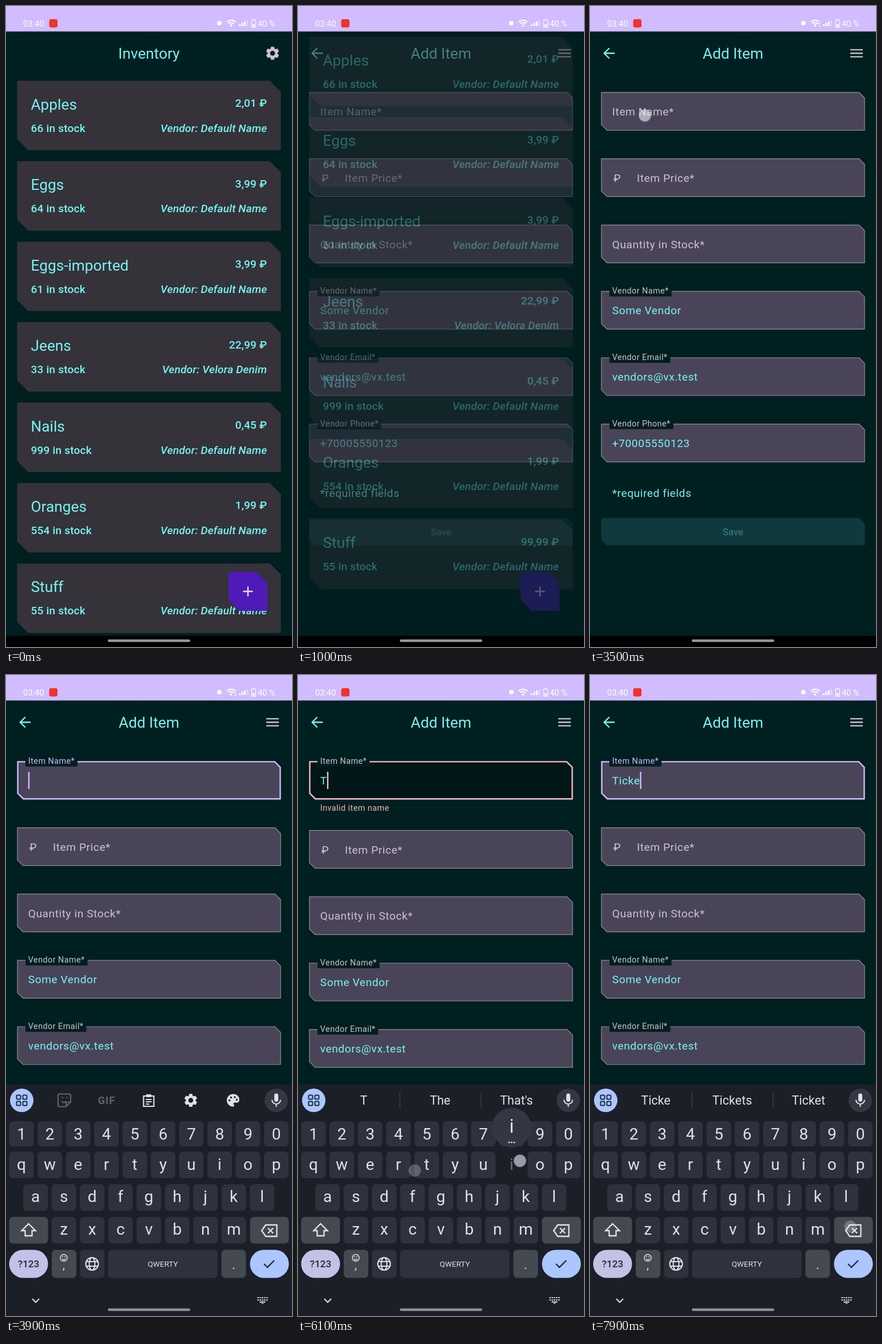
An HTML page for the animation above (8000 ms loop, 500 px wide and 1119 px high).

```html
<!DOCTYPE html>
<html lang="en">
<head>
<meta charset="utf-8">
<title>Inventory app</title>
<style>
  html, body { margin: 0; width: 100%; height: 100%; overflow: hidden; background: #001f20; }
  svg { display: block; width: 100%; height: 100%; font-family: Roboto, sans-serif; white-space: pre; }
</style>
</head>
<body>
<svg id="stage" viewBox="0 0 500 1119"></svg>
<script>
const LOOP = 8000, STEP = 100;
const TITLE = 26.25, BODY = 19.1, SMALL = 14.35;
const BG = '#001f20', CYAN = '#76f5f5', GREY = '#cac4d0', LILAC = '#d0bcff', PINK = '#fbbcc4';
const KB = '#1b1f28', KEY = '#2f323c', KEY2 = '#444952', INK = '#dfe2ea', BLUE = '#acc6ff';

const items = [
  ['Apples', '2,01', 66], ['Eggs', '3,99', 64], ['Eggs-imported', '3,99', 61],
  ['Jeens', '22,99', 33, 'Velora Denim'], ['Nails', '0,45', 999],
  ['Oranges', '1,99', 554], ['Stuff', '99,99', 55]
];
const fields = [
  ['Item Name*'], ['Item Price*'], ['Quantity in Stock*'],
  ['Vendor Name*', 'Some Vendor'], ['Vendor Email*', 'vendors@vx.test'], ['Vendor Phone*', '+70005550123']
];
// time, x, y, key
const taps = [
  [3500, 96, 191], [5200, 39, 970], [6000, 204, 865, 't'], [6100, 388, 848, 'i'],
  [6300, 205, 972, 'c'], [6400, 398, 915, 'k'], [6500, 131, 884, 'e'],
  [6900, 180, 858, 'r'], [7100, 222, 860, 't'], [7500, 455, 963, '<'], [7800, 455, 963, '<']
];
const hints = {
  T: ['T', 'The', "That's"], Ti: ['Ti', 'Time', 'Tim'], Tic: ['Tic', 'Tick', 'Ticket'],
  Tick: ['Tick', 'Ticket', 'Tickets'], Ticke: ['Ticke', 'Tickets', 'Ticket'],
  Ticker: ['Ticker', 'Tickers', 'Ticket'], Tickert: ['Tickert', 'Ticket', 'Tickets']
};

const clamp = v => Math.max(0, Math.min(1, v));
const between = (t, a, b) => t >= a && t < b;
const smooth = u => u * u * (3 - 2 * u);
// cubic-bezier(.4, 0, .2, 1)
function fastOut(u) {
  let lo = 0, hi = 1;
  for (let i = 0; i < 20; i++) {
    const s = (lo + hi) / 2;
    if (1.2 * s - 1.8 * s * s + 1.6 * s ** 3 < u) lo = s; else hi = s;
  }
  return smooth((lo + hi) / 2);
}
const pen = document.createElement('canvas').getContext('2d');
function textWidth(s, size, gap) {
  pen.font = `${size}px Roboto, sans-serif`;
  return pen.measureText(s).width + gap * s.length;
}

const text = (x, y, s, size, fill, more = '') =>
  `<text x="${x}" y="${y}" font-size="${size}" fill="${fill}" ${more}>${s}</text>`;
const MID = 'text-anchor="middle"', END = 'text-anchor="end"', MEDIUM = 'font-weight="500"';
const body = (x, y, s, fill) => text(x, y, s, BODY, fill, 'letter-spacing=".58"');
const strong = (x, y, s, more = '') => text(x, y, s, BODY, CYAN, `${MEDIUM} letter-spacing=".17" ${more}`);
const small = (x, y, s, fill) => text(x, y, s, SMALL, fill, 'letter-spacing=".46"');
const rect = (x, y, w, h, fill, r = 0) =>
  `<rect x="${x}" y="${y}" width="${w}" height="${h}" rx="${r}" fill="${fill}"/>`;
const disc = (x, y, r, fill, more = '') => `<circle cx="${x}" cy="${y}" r="${r}" fill="${fill}" ${more}/>`;
const group = (inner, more) => `<g ${more}>${inner}</g>`;
const line = (x, y, d, color, w = 2, fill = 'none') =>
  `<path transform="translate(${x} ${y})" d="${d}" fill="${fill}" stroke="${color}" stroke-width="${w}"/>`;
const cut = (x, y, w, h, c, fill, more = '') =>
  `<path d="M${x} ${y}h${w - c}l${c} ${c}v${h - c}h${c - w}l${-c} ${-c}z" fill="${fill}" ${more}/>`;

function gear(x, y, r, fill) {
  const pts = [];
  for (let k = 0; k < 6; k++)
    for (const [a, q] of [[-24, .74], [-14, 1], [14, 1], [24, .74]]) {
      const th = (k * 60 - 90 + a) * Math.PI / 180;
      pts.push((q * r * Math.cos(th)).toFixed(2) + ' ' + (q * r * Math.sin(th)).toFixed(2));
    }
  const h = r * .37;
  return `<path transform="translate(${x} ${y})" fill="${fill}" fill-rule="evenodd"
    d="M${pts.join('L')}zM${-h} 0a${h} ${h} 0 1 0 ${2 * h} 0a${h} ${h} 0 1 0 ${-2 * h} 0z"/>`;
}

function statusBar(t) {
  const W = '#fff';
  let s = rect(0, 0, 500, 44.5, LILAC) + text(30, 35.5, '03:40', 14.6, W) +
    rect(75.5, 23, 14.5, 14.5, '#f0322b', 3.5) + disc(373, 30, 4, W) +
    line(393.5, 35, 'M-7.8-7a11 11 0 0 1 15.6 0M-5-4a7 7 0 0 1 10 0', W, 2) + disc(393.5, 34, 2, W);
  for (let i = 0; i < 4; i++)
    s += `<g opacity="${i < 3 ? 1 : .35}">${rect(407 + i * 4.5, 32 - i * 2.5, 3, 3 + i * 2.5, W)}</g>`;
  if (between(t, 2700, 5700)) s += rect(400, 30, 2, 2, W) + rect(400, 34, 2, 2, W);
  return s + line(433, 30, 'M-3.5-5.5h7v13h-7zM-1.5-7h3', W, 1.2) + rect(431, 32, 4, 4, W) +
    text(440, 35.5, '40 %', 14.6, W);
}

function listScreen(t) {
  const scroll = 77 * smooth(clamp((t - 50) / 600));
  const headY = 82.5 - scroll / 2;
  let s = rect(0, 0, 500, 1119, BG) +
    group(text(250, headY + 9.3, 'Inventory', TITLE, CYAN, MID) + gear(466, headY, 11.7, GREY),
      'clip-path="url(#bar)"');
  items.forEach(([name, price, stock, vendor = 'Default Name'], i) => {
    const y = 130.5 + i * 140.45 - scroll;
    s += cut(19.5, y, 461, 121.2, 19.4, '#363239') + text(43.5, y + 50.2, name, TITLE, CYAN) +
      strong(456.3, y + 45.7, price + ' ₽', END) +
      strong(43.5, y + 89.2, stock + ' in stock') +
      strong(456.3, y + 89.2, 'Vendor: ' + vendor, END + ' font-style="italic"');
  });
  return `<clipPath id="bar"><rect y="44" width="500" height="${77 - scroll}"/></clipPath>` + s +
    cut(389, 988, 68, 68, 19.5, '#4f1ab8') + line(423, 1022, 'M-8.5 0h17M0-8.5v17', '#e9ddff', 2.4);
}

function typed(t) {
  let s = '';
  for (const [at, , , key] of taps)
    if (key && t >= at + STEP) s = key == '<' ? s.slice(0, -1) : s + (s ? key : 'T');
  return s;
}

function formScreen(t) {
  const value = typed(t), error = value.length == 1, focus = t >= 3600;
  const push = error ? 4.8 : 0;
  let s = line(33.5, 82.5, 'M9.7 0h-18M.3-9l-9 9l9 9', CYAN, 2.4) +
    text(250, 91.8, 'Add Item', TITLE, CYAN, MID) +
    line(466, 82.5, 'M-11-6.1h22M-11 0h22M-11 6.1h22', GREY, 2.4);
  fields.forEach(([label, content], i) => {
    const on = focus && i == 0, y = 150.2 + i * 115.8 + (i ? push : 0);
    const edge = on ? (error ? PINK : LILAC) : '#938f99', w = on ? 2.4 : 1.2;
    const lift = content ? 1 : on ? smooth(clamp((t - 3550) / 150)) : 0;
    // the outline lies inside the box
    s += cut(19.4 + w / 2, y + w / 2, 461.2 - w, 67.2 - w, 9.7, on && error ? '#001617' : '#4a4458',
      `stroke="${edge}" stroke-width="${w}"`);
    if (lift == 1) {
      s += rect(34, y - 9.5, textWidth(label, SMALL, .46) + 9.7, 19, BG) +
        small(38.8, y + 4.7, label, on && !error ? LILAC : GREY);
    } else {
      const size = BODY + (SMALL - BODY) * lift;
      s += text(i == 1 ? 82 : 38.8, y + 40.7 - 36 * lift, label, size, on ? LILAC : GREY, 'letter-spacing=".58"');
    }
    if (i == 1) s += body(41, y + 40.7, '₽', GREY);
    if (content) s += body(38.8, y + 40.7, content, CYAN);
    if (on) {
      s += body(38.8, y + 40.7, value, CYAN);
      if (!between(t, 4200, 4600) && !between(t, 5100, 5700))
        s += rect(38.8 + textWidth(value, BODY, .58), 169, 2.4, 30, edge);
      if (error) s += small(38.8, 237, 'Invalid item name', '#f4b5ae');
    }
  });
  return s + body(38.8, 856.5 + push, '*required fields', CYAN) +
    cut(19.5, 894 + push, 461, 47.5, 9.7, '#0f393c') +
    text(250, 923.5 + push, 'Save', 16.7, '#31787d', MEDIUM + ' ' + MID);
}

function toolbar(value) {
  let s = disc(27.5, 742.5, 20.5, BLUE);
  for (const x of [18.5, 29.5]) for (const y of [733.5, 744.5])
    s += `<rect x="${x}" y="${y}" width="7" height="7" rx="1.5" fill="none" stroke="#1b2a48" stroke-width="2"/>`;
  s += disc(472.5, 742.5, 20.5, '#343842') + rect(469, 730.5, 7, 14.5, INK, 3.5) +
    line(472.5, 742, 'M-7.5-.5a7.5 7.5 0 0 0 15 0M0 7v5', INK, 2);
  if (value) {
    hints[value].forEach((w, i) => s += text(115 + i * 133.5, 750, w, 21.5, INK, MID));
    return s + rect(177.5, 729, 1.2, 27, '#434751') + rect(319.5, 729, 1.2, 27, '#434751');
  }
  const dim = '#60646e';
  s += line(102, 742.5, 'M-11-8q0-3 3-3h16q3 0 3 3v11l-8 8h-11q-3 0-3-3zM11 3h-5q-3 0-3 3v5M-5 1q4 6 8 0M-5-5h3M3-5h3', dim, 2.2) +
    text(176, 749, 'GIF', 18, dim, `${MID} font-weight="700" letter-spacing="1"`) +
    line(249.5, 743, 'M-9-8h18v18h-18zM-5-2h10M-5 2h10M-5 6h6', INK, 2.2) +
    rect(244.5, 732, 10, 5, INK, 2) + gear(323, 742.5, 11.5, INK) +
    line(397, 742.5, 'M0-11a11 11 0 1 0 0 22c3 0 2-3 1-4s0-3 2-3h3c3 0 5-2 5-5c0-6-5-10-11-10z', 'none', 0, INK);
  for (const [x, y] of [[-6.5, 0], [-3.5, -5], [3, -5.5], [6.5, -1]]) s += disc(397 + x, 742.5 + y, 1.7, KB);
  return s;
}

function keyboard(t) {
  const caps = between(t, 5300, 6100);
  const tap = taps.find(p => p[0] == t && p[3] && p[3] != '<');
  const held = tap && tap[3];
  let s = rect(0, 715, 500, 404, KB) + toolbar(typed(t)), popup = '';
  // letters, first centre, top, height, baseline
  const rows = [
    ['1234567890', 27, 779, 44, 811], ['qwertyuiop', 27, 832, 46.5, 864],
    ['asdfghjkl', 51.7, 889, 46.5, 920], ['zxcvbnm', 101.3, 946, 46.5, 977]
  ];
  for (const [chars, first, top, h, base] of rows)
    [...chars].forEach((c, i) => {
      const x = first + i * 49.5, glyph = caps ? c.toUpperCase() : c, down = c == held;
      if (!down) s += rect(x - 21.5, top, 43, h, KEY, 7);
      s += text(x, base, glyph, 28, down ? '#6a6d74' : INK, MID);
      if (down) {
        popup = disc(x, top - 42, 34.5, '#343741') + text(x, top - 33, glyph, 33, INK, MID);
        if ('ietc'.includes(c)) for (const d of [-4.5, 0, 4.5]) popup += disc(x + d, top - 16, 1.4, INK);
      }
    });
  s += rect(5.5, 946, 68, 46.5, KEY2, 7) +
    line(39.5, 969, 'M0-11l12 12h-6v9h-12v-9h-6z', INK, 2.3, caps ? INK : 'none') +
    rect(426.5, 946, 68, 46.5, KEY2, 7) +
    line(460, 970, 'M-13 0l7-10h19.5v20h-19.5zM-2-4.5l9 9M7-4.5l-9 9', INK, 2.3) +
    rect(5.5, 1003.5, 68, 49, '#c3c1e6', 24.5) + text(39.5, 1034, '?123', 17, '#23263a', MEDIUM + ' ' + MID) +
    rect(80, 1003.5, 43, 49, KEY2, 7) + line(101, 1017.5, 'M-6 0a6 6 0 1 0 12 0a6 6 0 1 0-12 0M-3 1.5q3 4 6 0M-3-2h2M1-2h2', INK, 1.5) +
    text(101, 1037, ',', 20, INK, MID) +
    rect(129.3, 1003.5, 43, 49, KEY, 7) +
    line(150.5, 1028, 'M-11 0a11 11 0 1 0 22 0a11 11 0 1 0-22 0M-5 0a5 11 0 1 0 10 0a5 11 0 1 0-10 0M-10-4h20M-10 4h20', INK, 2) +
    rect(178.5, 1003.5, 191.5, 49, KEY, 7) + text(274.3, 1032.5, 'QWERTY', 13.5, INK, MID) +
    rect(376.5, 1003.5, 43, 49, KEY2, 7) + text(398, 1037, '.', 22, INK, MID) +
    rect(426.5, 1003.5, 68, 49, BLUE, 24.5) + line(460, 1028, 'M-9 0l6 6l12-12', '#1b2a48', 2.4) +
    line(52, 1092, 'M-6-3l6 6l6-6', INK, 2) +
    line(448.5, 1089, 'M-9-2h18M-9 2h18', INK, 2.2).replace('/>', ' stroke-dasharray="2.4 1.5"/>') +
    line(448.5, 1089, 'M-5 5.5h10', INK, 2) + line(448.5, 1097.5, 'M-2.5-1h5l-2.5 2z', 'none', 0, INK);
  return s + popup;
}

function touches(t) {
  return taps.map(([at, x, y]) => {
    const alpha = t < at ? 0 : [.62, .27, .1][(t - at) / STEP] || 0;
    return alpha ? group(disc(x, y, 10.3, '#fff', 'fill-opacity=".9" stroke="#bcd0ff" stroke-width="1.3"'), `opacity="${alpha}"`) : '';
  }).join('');
}

function scene(t) {
  const fade = fastOut(clamp((t - 705) / 700));
  let s = rect(0, 0, 500, 1119, BG);
  // the list fades away on top of the form
  if (fade > 0) s += group(formScreen(t), `opacity="${fade}"`);
  if (t < 1405) s += group(listScreen(t), `opacity="${1 - fade}"`);
  s += statusBar(t) + rect(0, 1099.5, 500, 19.5, '#000');
  const rise = 1 - (1 - clamp((t - 3600) / 300)) ** 2;
  if (rise > 0) s += group(keyboard(t), `transform="translate(0 ${404 * (1 - rise)})"`);
  return s + rect(178, 1105.7, 144, 4.6, rise > 0 ? '#8f9198' : '#969696', 2.3) + touches(t);
}

const stage = document.getElementById('stage');
let shown = -1;
function tick() {
  const t = Math.floor(performance.now() % LOOP / STEP) * STEP;
  if (t != shown) stage.innerHTML = scene(shown = t);
  requestAnimationFrame(tick);
}
tick();
</script>
</body>
</html>
```
